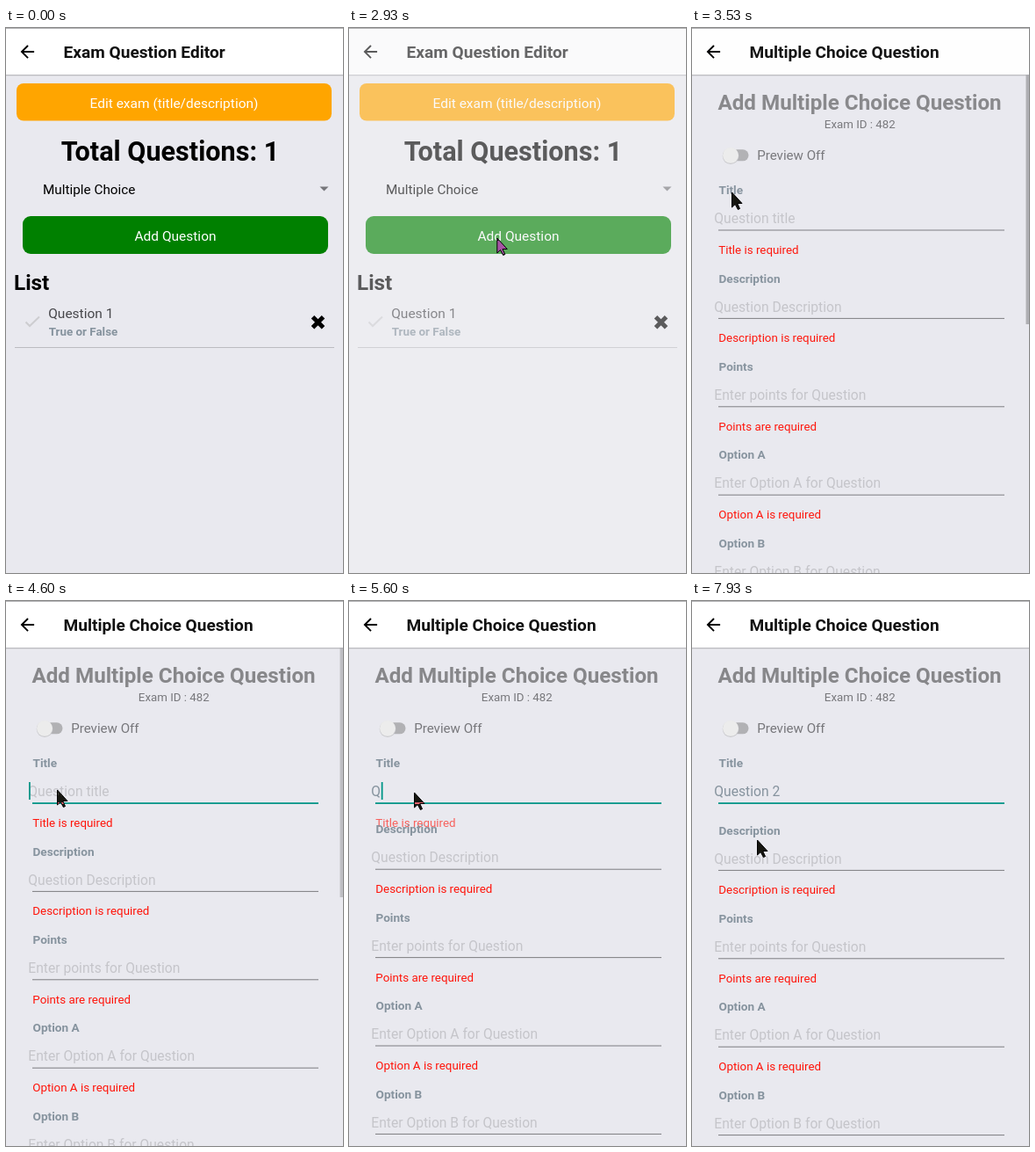
These frames come from a looping animation (384x620 px, 8000 ms). An HTML page:

```html
<!DOCTYPE html>
<html lang="en">
<head>
<meta charset="utf-8">
<title>Exam question editor</title>
<style>
  html, body { margin: 0; width: 100%; height: 100%; overflow: hidden; background: #e9e9ef; }
  svg { display: block; width: 100vw; height: 100vh; font-family: Roboto, sans-serif; }
  text { white-space: pre; }
  .b { font-weight: 700; }
  .c { text-anchor: middle; }
  #invert { mix-blend-mode: difference; }
</style>
</head>
<body>
<svg id="stage" viewBox="0 0 384 620"></svg>
<script>
const TICK = 200 / 3, LOOP = 8000;
const GREY = '#86939e', TEAL = '#009688', BG = '#e9e9ef', RULE = '#7d7d81';

const text = (x, y, size, fill, str, cls = '', id = '') =>
  `<text x="${x}" y="${y}" font-size="${size}" fill="${fill}" class="${cls}" id="${id}">${str}</text>`;
const rect = (x, y, w, h, fill, extra = '') =>
  `<rect x="${x}" y="${y}" width="${w}" height="${h}" fill="${fill}" ${extra}/>`;

const page = title =>
  rect(0, 0, 384, 620, BG) + rect(0, 0, 384, 53, '#fff') +
  rect(0, 53, 384, 1, '#bdbdc1') + rect(0, 54, 384, 1, '#dadadf') +
  '<path transform="translate(12.7 15.4) scale(.97)" d="M20 11H7.83l5.59-5.59L12 4l-8 8 8 8 1.41-1.41L7.83 13H20z"/>' +
  text(65.6, 34.3, 19.1, '#111', title, 'b');

const listScreen = page('Exam Question Editor') +
  rect(12, 63, 359, 42.5, '#ffa500', 'rx="8"') +
  text(191.5, 90.5, 15.5, '#fff', 'Edit exam (title/description)', 'c') +
  text(187, 150.5, 30.6, '#000', 'Total Questions: 1', 'b c') +
  text(42, 188.5, 15.3, '#000', 'Multiple Choice') +
  '<path d="M357.500 180.500h10l-5 5z" fill="#76767a"/>' +
  rect(19, 214, 348, 43, '#008000', 'rx="9"') +
  text(193, 242, 15.5, '#fff', 'Add Question', 'c') +
  text(9, 298, 24.3, '#000', 'List', 'b') +
  '<path d="M22.500 334.500l4.500 4.500 11-10.500" fill="none" stroke="#cdcdd0" stroke-width="2"/>' +
  text(48.2, 330.3, 15.5, '#47474b', 'Question 1') +
  text(48.7, 350.2, 13.4, GREY, 'True or False', 'b') +
  '<path d="M349.500 328.700l12 12m0-12l-12 12" stroke="#000" stroke-width="5"/>' +
  rect(10, 363, 364, 1, '#bcbcc1');

const fieldRow = (label, hint, error, i) =>
  `<g transform="translate(0 ${i * 100.4})">` +
  text(30.5, 189.2, 13.6, GREY, label, 'b') +
  text(25.3, 222.2, 15.65, '#c5c5ca', hint, '', 'hint' + i) +
  rect(30, 229.5, 326, 1, RULE, `id="line${i}"`) +
  text(30.3, 257, 13.35, '#ff140a', error, '', 'error' + i) + '</g>';

const rows = [
  ['Title', 'Question title', 'Title is required'],
  ['Description', 'Question Description', 'Description is required'],
  ['Points', 'Enter points for Question', 'Points are required'],
  ['Option A', 'Enter Option A for Question', 'Option A is required'],
  ['Option B', 'Enter Option B for Question', 'Option B is required']
].map((r, i) => fieldRow(...r, i));

const formScreen = page('Multiple Choice Question') +
  text(191, 92.8, 24.2, '#87878a', 'Add Multiple Choice Question', 'b c') +
  text(191.3, 114, 13.3, '#77777b', 'Exam ID : 482', 'c') +
  rect(38, 138.3, 26.5, 13, '#b1b1b4', 'rx="6.5"') +
  '<circle cx="44" cy="145.600" r="9.300" fill="#c9c9cd"/><circle cx="44" cy="144.800" r="9" fill="#ececec"/>' +
  text(74.2, 150.2, 15.1, '#77777b', 'Preview Off') +
  rows[0] +
  text(25.3, 222.2, 15.65, GREY, '', '', 'value') +
  rect(26, 206, 1.8, 20, TEAL, 'id="caret"') +
  `<g id="below">${rows.slice(1).join('')}</g>` +
  rect(380.5, 53, 3.5, 284, '#aeaeb2', 'id="bar"');

const arrow = 'd="M.5 0V17L4.200 13.500L7.400 19.500L9.500 18.500L6.700 12.500H12Z"';
const stage = document.getElementById('stage');
stage.innerHTML =
  `<g>${listScreen}</g>` + rect(0, 0, 384, 620, '#f2f2f5', 'id="veil"') +
  `<g id="form">${formScreen}</g>` + rect(0, 0, 384, 1, '#b4b4b6') +
  `<path id="invert" ${arrow} fill="#fff"/><path id="outline" ${arrow} fill="none" stroke="#000"/>`;

const el = id => document.getElementById(id);
const set = (id, attrs) => { for (const k in attrs) el(id).setAttribute(k, attrs[k]); };

// Linear interpolation over [time, ...values] keys
function track(n, keys) {
  if (n <= keys[0][0]) return keys[0].slice(1);
  for (let i = 1; i < keys.length; i++) {
    const [a, ...from] = keys[i - 1], [b, ...to] = keys[i];
    if (n <= b) return from.map((v, j) => v + (to[j] - v) * (n - a) / (b - a));
  }
  return keys[keys.length - 1].slice(1);
}

const POINTER = [
  [2, 368, 564], [8, 270, 330], [12, 185, 175], [14, 175, 183], [20, 175, 183],
  [28, 259, 239], [39, 259, 239], [46, 132, 239], [53, 45, 187], [62, 58, 215],
  [75, 58, 215], [81, 74, 218], [115, 74, 218], [119, 74, 272]
];
const FOCUS = 67, ANSWER = 'Question 2';
const KEYS = [80, 89, 91, 93, 97, 100, 102, 105, 107, 110];

function draw(n) {
  const [x, y] = track(n, POINTER);
  for (const id of ['invert', 'outline'])
    set(id, { transform: `translate(${x} ${y})`, visibility: n < 2 ? 'hidden' : 'visible' });

  set('veil', { opacity: track(n, [[41, 0], [46, .63], [49, 1]]) });
  set('form', { opacity: track(n, [[45, 0], [46, .04], [53, .98], [58, 1]]) });
  set('bar', { opacity: track(n, [[FOCUS, 1], [74, 0]]) });

  const focused = n >= FOCUS;
  set('line0', { fill: focused ? TEAL : RULE, y: focused ? 229.2 : 229.5, height: focused ? 1.8 : 1 });

  const typed = KEYS.filter(k => k <= n).length;
  el('value').textContent = ANSWER.slice(0, typed);
  set('hint0', { opacity: typed ? 0 : 1 });
  const since = n - (typed ? KEYS[typed - 1] : FOCUS);
  set('caret', {
    x: 26 + (typed ? el('value').getComputedTextLength() : 0),
    opacity: focused && Math.floor(since / 7) % 2 === 0 ? 1 : 0
  });

  // The error fades while the rows below spring up into its place
  const s = Math.max(0, n - KEYS[0]);
  const rise = 24 * (1 - Math.exp(-.75 * s) * Math.cos(.8 * s));
  set('error0', { opacity: track(n, [[KEYS[0], 1], [91, 0]]) });
  set('below', { transform: `translate(0 ${-rise})` });
}

const start = performance.now();
function loop() {
  const t = (performance.now() - start) % LOOP;
  draw(Math.floor((t + 5) / TICK) % 120);
  requestAnimationFrame(loop);
}
loop();
</script>
</body>
</html>
```
